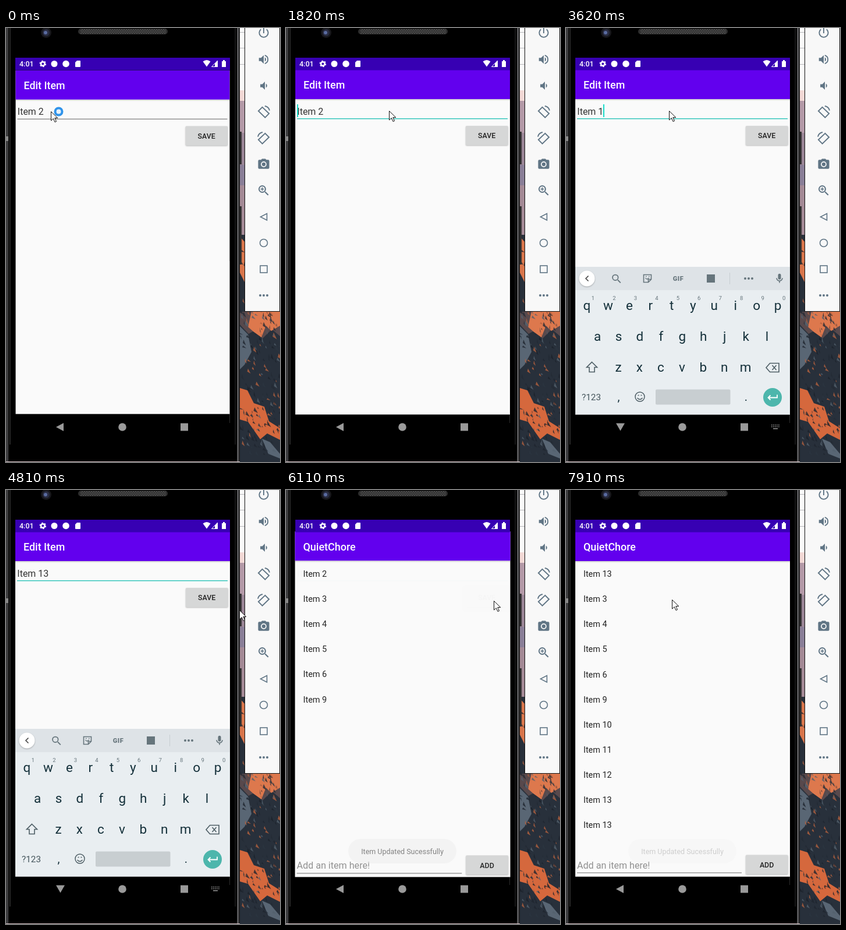
An HTML page that plays this animation: 471x745 px, repeating every 8000 ms.

```html
<!DOCTYPE html>
<html lang="en">
<head>
<meta charset="utf-8">
<title>Edit item</title>
<style>
  html, body { margin: 0; width: 100%; height: 100%; overflow: hidden; background: #000; }
  svg { display: block; width: 471px; height: 745px; font-family: Roboto, sans-serif; }
  .medium { font-weight: 500; }
  .line { fill: none; stroke: currentColor; stroke-width: 1.6; }
  .shadow { filter: drop-shadow(0 1px 1px #0004); }
  .pressed { filter: drop-shadow(0 2px 3px #0006); }
</style>
</head>
<body>
<script>
const LOOP = 8000;
const GREY = '#607585', TEAL = '#03dac5';

const rect = (x, y, w, h, fill, more = '') =>
  `<rect x="${x}" y="${y}" width="${w}" height="${h}" fill="${fill}" ${more}/>`;
const circle = (x, y, r, fill, more = '') => `<circle cx="${x}" cy="${y}" r="${r}" fill="${fill}" ${more}/>`;
const path = (d, fill, more = '') => `<path d="${d}" fill="${fill}" ${more}/>`;
const line = (d, color, width = 1.6, more = '') =>
  `<path d="${d}" fill="none" stroke="${color}" stroke-width="${width}" ${more}/>`;
const text = (x, y, size, s, fill = '#212121', more = '') =>
  `<text x="${x}" y="${y}" font-size="${size}" fill="${fill}" ${more}>${s}</text>`;
const middle = 'text-anchor="middle"';
// Icon drawn on a 24 unit grid, centred on x, y
const icon = (x, y, size, color, body) =>
  `<g transform="translate(${x - size / 2} ${y - size / 2}) scale(${size / 24})" fill="${color}" color="${color}">${body}</g>`;
const dots = (x, y, color) => [-6, 0, 6].map(d => circle(x + d, y, 2, color)).join('');

const SEARCH = '<circle cx="9.5" cy="9.5" r="5.5" class="line" style="stroke-width:2"/><path d="M13.5 15l1.5-1.5 5.5 5.5-1.5 1.5z"/>';
const SPEAKER = 'M3 9v6h4l5 5V4L7 9zM14 8v8q2.5-1.3 2.5-4T14 8z';
const TURN = '<path class="line" style="stroke-width:2" d="M9.500 3.500L21.500 15l-7 7L2.500 10.500zM14 1.500q7 1 8.500 8"/>';

function wallpaper() {
  let seed = 11;
  const rnd = () => (seed = seed * 16807 % 2147483647) / 2147483647;
  let s = rect(400, 0, 71, 745, '#fafafa')
    + [7, 34, 62].map(y => rect(402, y, 9, 1, '#b8b8bc')).join('')
    + rect(402, 107, 9, 18, '#f3d9d6') + rect(402, 125, 9, 55, '#b49aa8')
    + rect(402, 180, 9, 90, '#9a8596') + rect(402, 235, 9, 35, '#8a7f98')
    + rect(402, 270, 9, 85, '#a48a96') + rect(402, 355, 69, 390, '#28303b')
    + path('M402 358l9 10v70l-9-18z', '#d9764c')
    + path('M402 487h69v42l-14-12-16 16-13-14-11 6-15-16z', '#58494c')
    + path('M422 487h49v24l-15 9-9-9-8 20-14-10-9-8z', '#dd784d')
    + path('M402 512l14 14 6 30-12 22-8 8z', '#596674')
    + path('M402 618l13 4 11 22 18 6 8 25 19 12v20l-22-11-12 10-21-30-14-4z', '#d5683d')
    + path('M440 705l14 6 17 20v8l-20-8z', '#596674');
  const tones = ['#1c222b', '#232a35', '#2b3440', '#53606d', '#b0603f', '#1f2630'];
  for (let i = 0; i < 260; i++) {
    const x = 402 + rnd() * 68, y = 362 + rnd() * 370, w = 1 + rnd() * 5, h = 3 + rnd() * 9;
    s += path(`M${x} ${y}l${w} ${h}l${-w * 1.3} ${-h * .4}z`, tones[i % 6], 'opacity=".8"');
  }
  return s;
}

function emulator() {
  const y = i => 9 + 45 * i;
  return rect(410, -2, 61, 489, '#111') + rect(411, -2, 59, 488, '#f8f8f8')
    + icon(443, 8, 23, GREY, '<path d="M11 3h2v10h-2z"/><path class="line" style="stroke-width:2" d="M7 6a8 8 0 1 0 10 0"/>')
    + icon(443, y(1), 22, GREY, path(SPEAKER, GREY) + '<path class="line" style="stroke-width:2" d="M14 4.3a8 8 0 0 1 0 15.4"/>')
    + icon(445, y(2), 21, GREY, path(SPEAKER, GREY))
    + icon(443, y(3), 23, GREY, TURN)
    + icon(443, y(4), 23, GREY, `<g transform="matrix(-1 0 0 1 24 0)">${TURN}</g>`)
    + icon(443, y(5), 23, GREY, '<path d="M9 2L7.2 4H4q-2 0-2 2v12q0 2 2 2h16q2 0 2-2V6q0-2-2-2h-3.2L15 2z"/><circle cx="12" cy="12" r="4.2" fill="none" stroke="#f8f8f8" stroke-width="1.8"/>')
    + icon(443, y(6), 24, GREY, SEARCH + '<path class="line" d="M6.5 9.5h6M9.5 6.5v6"/>')
    + line('M448.500 318.500v11.500l-11-5.750z', GREY) + circle(443, 369, 6.5, 'none', `stroke="${GREY}" stroke-width="1.6"`)
    + rect(437, 408, 12, 12, 'none', `stroke="${GREY}" stroke-width="1.6"`) + dots(443, 459, GREY);
}

function phone() {
  return rect(0, 0, 402, 745, '#000') + rect(0, 0, 4, 745, '#3c3c3e') + rect(0, 186, 4, 8, '#888')
    + rect(4, 0, 2, 745, '#0c0c0c') + rect(6, 0, 2, 715, '#252525') + rect(393, 0, 2, 715, '#161616')
    + rect(397, 0, 5, 745, '#3a3a3c') + rect(398, 0, 1, 745, '#77777a') + rect(401, 0, 1, 745, '#111')
    + rect(402, 178, 3, 56, '#333') + rect(402, 306, 3, 100, '#333')
    + rect(384, 400, 1, 278, '#2c2c2c')
    + circle(69, 8, 9, '#17171b') + circle(69, 8, 6, '#2a2d42') + circle(68, 8, 3, '#5a6ba0')
    + rect(124, 1, 154, 10, '#2e2e2e', 'rx="5"')
    + [3, 5, 7, 9].map(y => line(`M${127 + y % 4} ${y}H275`, '#555', 1.5, 'stroke-dasharray="2 2"')).join('')
    + rect(0, 744, 402, 1, '#d9c4c8');
}

const statusBar = rect(16, 51, 369, 21.5, '#3700b3')
  + text(23, 66, 12.5, '4:01', '#fff', 'class="medium"')
  + circle(63.3, 61.5, 3.3, 'none', 'stroke="#fff" stroke-width="2.6"')
  + circle(63.3, 61.5, 5, 'none', 'stroke="#fff" stroke-width="1.6" stroke-dasharray="2.6 2.6"')
  + circle(83, 61.5, 5.5, '#fff') + circle(103, 61.5, 5.8, '#fff')
  + path('M122 56h5q1 0 1 1v9q0 1-1 1h-7q-1 0-1-1v-7z', '#fff')
  + path('M338.500 57.500q6.500-5 13 0l-6.500 9z', '#fff')
  + line('M363.500 56v10.500h-10z', '#fff', 1) + path('M359 61l5-5v11h-5z', '#fff')
  + path('M371 57h2v-2h3v2h2v10h-7z', '#fff');

const navBar = `<path id="back" fill="#9a9a9a"/>` + circle(200, 685, 6.8, '#9a9a9a')
  + rect(300, 678.5, 13, 13, '#9a9a9a')
  + `<g id="kbIcon">${[681.5, 684.5].map(y => line(`M353 ${y}h14`, '#9a9a9a', 1.6, 'stroke-dasharray="1.6 1.4"')).join('')}${rect(356, 687, 8, 1.5, '#9a9a9a')}</g>`;

const page = (title, body) => rect(16, 72, 369, 591.5, '#fafafa')
  + rect(16, 122, 369, 3, 'url(#barShade)') + rect(16, 72, 369, 50, '#6200ee')
  + text(30, 104.3, 17.9, title, '#fff', 'class="medium"') + body;

const button = (x, y, label, id) => rect(x, y, 72.5, 33, '#d6d7d7', `rx="1.5" class="shadow" id="${id}"`)
  + text(x + 36.1, y + 21.3, 12.4, label, '#212121', `class="medium" ${middle}`);

const editPage = page('Edit Item', text(19.3, 148.5, 16, '', '#333', 'id="field"')
  + rect(19, 155, 362, 1.4, '#8a8a8a', 'id="underline"')
  + rect(0, 131, 1.8, 22, TEAL, 'id="caret"')
  + path('M64.500 153l6.500 6a9 9 0 1 1-13 0z', TEAL, 'id="handle"')
  + button(309, 168, 'SAVE', 'save'));

const items = [13, 3, 4, 5, 6, 9, 10, 11, 12, 13, 13];
const listPage = page('QuietChore',
  items.map((n, i) => text(30, 149.3 + 43.05 * i, 14.4, `Item ${n}`, '#212121', 'class="item"')).join('')
  + text(19, 649.5, 16.1, 'Add an item here!', '#909090') + rect(19, 656.5, 283, 1.2, '#858585')
  + button(309, 626.500, 'ADD', 'add'));

function keyboard() {
  const ink = '#14303a', soft = '#66757c', step = 36.45;
  const row = (keys, x, y) => [...keys].map((k, i) => text(x + step * i, y, 22.5, k, ink, middle)).join('');
  return rect(16, 410, 369, 253.5, '#e9eef1') + rect(16, 410, 369, 40, '#dee3e7')
    + circle(36, 430, 13.5, '#fff', 'class="shadow"') + line('M38.500 425.500l-4.500 4.500 4.500 4.500', '#444')
    + icon(87, 430.5, 21, soft, SEARCH)
    + line('M133.500 423.500h13v8l-5 5h-8zM146.500 431.500h-5v5', soft)
    + line('M136.500 429q2.500 4 6 0M137 426.500h1.500M142 426.500h1.500', soft, 1.3)
    + text(193, 434, 11, 'GIF', soft, `font-weight="800" letter-spacing=".6" ${middle}`)
    + rect(242, 423, 14, 14, soft) + rect(281, 420, 1, 20, '#c6cdd1') + dots(314, 430, soft)
    + icon(367, 430, 20, soft, '<rect x="9" y="2" width="6" height="12" rx="3"/><path class="line" d="M6 11a6 6 0 0 0 12 0M12 17v4" style="stroke-width:2"/>')
    + row('qwertyuiop', 36, 484) + row('asdfghjkl', 54, 536.5) + row('zxcvbnm', 90, 589.5)
    + [...'1234567890'].map((k, i) => text(46.5 + step * i, 466.5, 9.5, k, soft, middle)).join('')
    + line('M44.500 573.500l9 9h-4.500v8h-9v-8h-4.500z', '#4d5d64')
    + line('M344 583l6.500-7.500h15.500v15h-15.500zM354.500 579l7 8M361.500 579l-7 8', '#4d5d64')
    + text(27, 639, 15.3, '?123', '#45555c') + text(90.5, 639.5, 20, ',', ink, middle) + text(309.5, 639.5, 20, '.', ink, middle)
    + circle(127, 633, 8, 'none', 'stroke="#4d5d64" stroke-width="1.5"')
    + line('M122.500 635q4.500 5 9 0M123.500 630.500h2M128.500 630.500h2', '#4d5d64', 1.5)
    + rect(154, 620.5, 128.5, 26, '#c8ced1', 'rx="2"')
    + circle(355, 634, 16, '#4db6ac') + line('M363 629.500v5h-15M351.500 630.500l-4 4 4 4', '#fff', 1.8);
}

const toast = rect(107, 599, 186, 42, '#eee', 'rx="21"')
  + text(200, 625, 12.5, 'Item Updated Sucessfully', '#222', middle);
const pointer = `<g id="ring">${circle(13.5, .5, 6, '#e6f2fc', 'stroke="#2f93ea" stroke-width="4"')}</g>`
  + path('M.5.500v15.500l3.800-3.500 2.700 6 2.500-1-2.700-6h5z', '#fff', 'stroke="#111"');

document.body.innerHTML = `<svg viewBox="0 0 471 745">
  <defs><linearGradient id="barShade" x2="0" y2="1"><stop stop-color="#0003"/><stop offset="1" stop-color="#0000"/></linearGradient></defs>
  ${wallpaper()}${phone()}${emulator()}${navBar}
  <g id="edit">${editPage}</g><g id="list">${listPage}</g>${statusBar}
  <g id="keys">${keyboard()}</g><g id="toast">${toast}</g><g id="pointer">${pointer}</g></svg>`;

const el = Object.fromEntries([...document.querySelectorAll('[id]')].map(e => [e.id, e]));
const rows = [...document.querySelectorAll('.item')];

// Each track holds its value from the given time until the next entry
const tracks = {
  pointer: [[0, 77, 143], [740, 128, 165], [870, 184, 189], [990, 231, 203], [1140, 251, 204], [1260, 213, 174],
    [1380, 178, 146], [1530, 177, 142], [4570, 245, 160], [4690, 330, 187], [4810, 401, 206], [4960, 379, 200],
    [5080, 357, 190], [6520, 229, 207], [6670, 204, 205], [6790, 187, 201], [6950, 186, 196], [7090, 182, 189], [7250, 182, 188]],
  field: [[0, 'Item 2'], [2950, 'Item '], [3500, 'Item 1'], [4030, 'Item 13']],
  caret: [[0, 0], [1820, 19], [2100, 64], [2830, 0], [2950, 55], [3360, 0], [3500, 64], [4030, 73], [4420, 0], [4960, 73], [5480, 0]],
  keys: [[0, 0, 0], [2830, 12, .79], [2950, 2, .96], [3080, 0, 1], [5990, 12, .5], [6110, 0, 0]],
  toast: [[0, 0], [6110, .55], [6250, .9], [6370, 1], [7660, .8], [7790, .5], [7910, .2]],
  list: [[0, 0], [6110, .98], [6250, 1]],
};
const at = (name, t) => tracks[name].findLast(k => k[0] <= t).slice(1);
const between = (t, a, b) => t >= a && t < b;
const show = (e, on) => e.setAttribute('visibility', on ? 'visible' : 'hidden');
const move = (e, x, y) => e.setAttribute('transform', `translate(${x} ${y})`);
// Screens grow or shrink slightly about the middle as they open
const zoom = (e, k) => e.setAttribute('transform', `translate(${200 * (1 - k)} ${368 * (1 - k)}) scale(${k})`);

function draw(t) {
  const [keysY, keysAlpha] = at('keys', t), [caretX] = at('caret', t), [listAlpha] = at('list', t);
  const typing = between(t, 2560, 6110), settling = between(t, 6110, 6250);
  move(el.pointer, ...at('pointer', t));
  show(el.ring, t < 1820);

  zoom(el.edit, t < 150 ? .997 : 1);
  el.field.textContent = at('field', t)[0];
  el.underline.setAttribute('fill', t < 1820 ? '#8a8a8a' : '#2cc4b8');
  el.caret.setAttribute('x', caretX);
  show(el.caret, caretX);
  show(el.handle, between(t, 2250, 2950));
  el.save.setAttribute('class', t < 5360 ? 'shadow' : 'pressed');

  el.list.setAttribute('opacity', listAlpha);
  zoom(el.list, settling ? 1.003 : 1);
  rows[0].textContent = settling ? 'Item 2' : 'Item 13';
  rows.forEach((row, i) => row.setAttribute('opacity', settling && i > 5 ? 0 : 1));

  move(el.keys, 0, keysY);
  el.keys.setAttribute('opacity', keysAlpha);
  el.toast.setAttribute('opacity', at('toast', t)[0]);
  el.back.setAttribute('d', typing ? 'M86 678.500h15l-7.500 13z' : 'M99 678v14l-13-7z');
  show(el.kbIcon, typing);
}

function tick() {
  draw(performance.now() % LOOP);
  requestAnimationFrame(tick);
}
tick();
</script>
</body>
</html>
```
